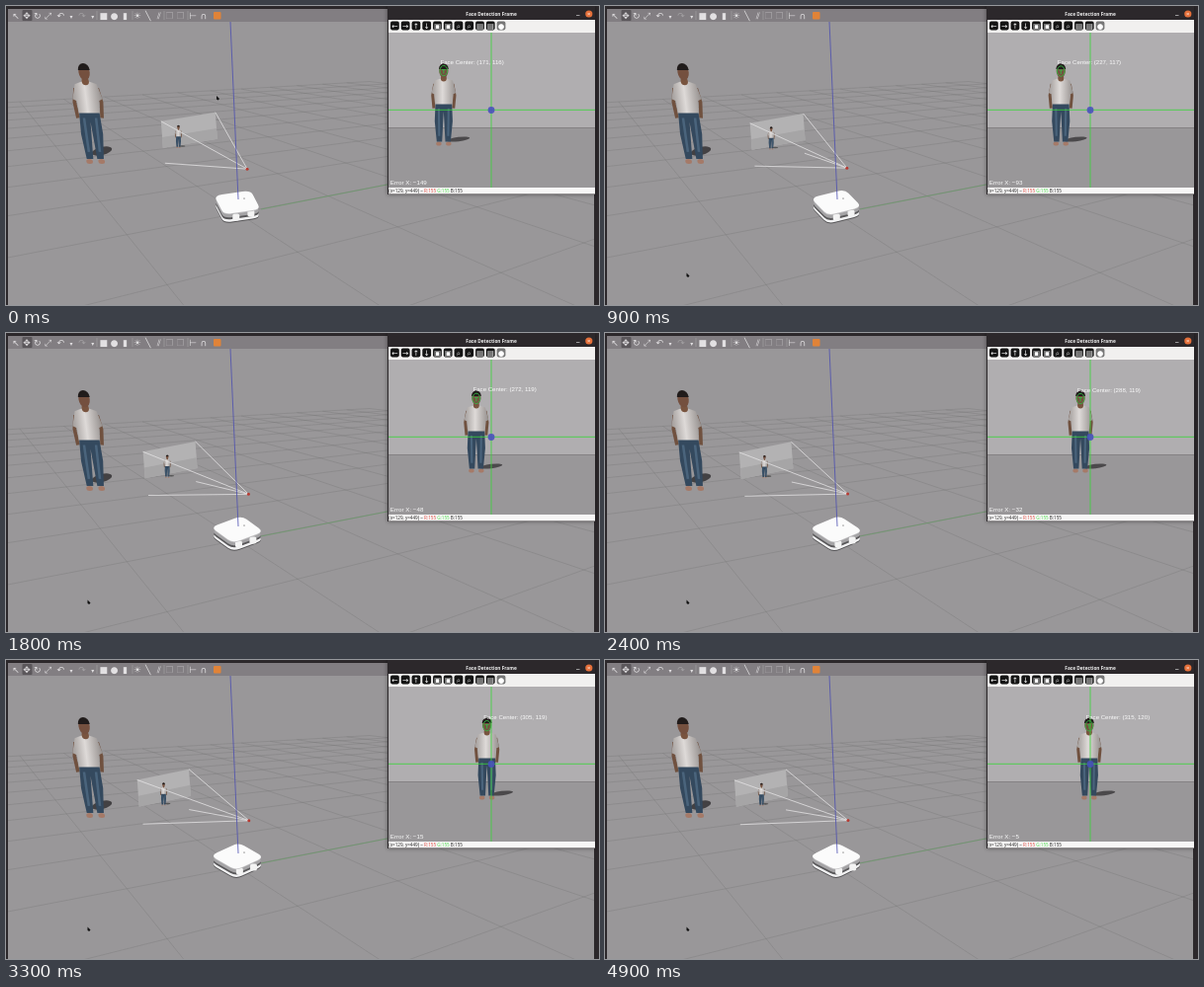
Recreate the animation shown at these times as an HTML page with a canvas. Size 600x303 px, loop 5 s.

```html
<!DOCTYPE html>
<html lang="en">
<head>
<meta charset="utf-8">
<title>Face tracking robot</title>
<style>
html, body { margin: 0; width: 100%; height: 100%; overflow: hidden; background: #999799; }
canvas { display: block; width: 600px; height: 303px; }
</style>
</head>
<body>
<canvas id="stage"></canvas>
<script>
const cv = document.getElementById('stage');
const c = cv.getContext('2d');
const dpr = window.devicePixelRatio || 1;
cv.width = 600 * dpr;
cv.height = 303 * dpr;

const LOOP = 5000, STEP = 100, FLOOR = '#999799', DARK = '#2c282b';
const UI = '"Open Sans", sans-serif', PLAIN = '"Liberation Sans", Arial, sans-serif';
const ICONS = '"DejaVu Sans", sans-serif';
// [time, horizontal error]; the error decays exponentially in between
const track = [[0, 149], [500, 128], [1300, 67], [2400, 32], [3300, 15], [4200, 8], [4900, 5]];

function errorAt(t) {
  const i = track.findIndex(([end]) => end >= t);
  if (i < 1) return track[0][1];
  const [t0, e0] = track[i - 1], [t1, e1] = track[i];
  return e0 * (e1 / e0) ** ((t - t0) / (t1 - t0));
}

function rect(x, y, w, h, color) {
  c.fillStyle = color;
  c.fillRect(x, y, w, h);
}

function trace(pts) {
  c.beginPath();
  pts.forEach(p => c.lineTo(...p));
}

function poly(pts, color) {
  trace(pts);
  c.fillStyle = color;
  c.fill();
}

function line(pts, color, width = 1) {
  trace(pts);
  c.strokeStyle = color;
  c.lineWidth = width;
  c.stroke();
}

function oval(x, y, rx, ry, color, tilt = 0) {
  c.beginPath();
  c.ellipse(x, y, rx, ry, tilt, 0, 7);
  c.fillStyle = color;
  c.fill();
}

function box(x, y, w, h, r, color) {
  c.beginPath();
  c.roundRect(x, y, w, h, r);
  c.fillStyle = color;
  c.fill();
}

function text(s, x, y, size, color, font = UI, weight = 400, align = 'left') {
  c.font = `${weight} ${size}px ${font}`;
  c.textAlign = align;
  c.fillStyle = color;
  c.fillText(s, x, y);
}

// ground point: u metres along the green axis, v metres away from the viewer
function ground(u, v) {
  const a = u * 0.077, b = v * 0.128, w = 1 + a + b;
  return [(235 + a * 1168 - b * 40) / w, (210 + (a + b) * 30) / w];
}

function grid() {
  const cell = 1.4, far = 10 * cell;
  for (let n = -10; n <= 10; n++) {
    const i = n * cell;
    const vNear = Math.max(-far, (-0.9 - i * 0.077) / 0.128);
    const uNear = Math.max(-far, (-0.9 - i * 0.128) / 0.077);
    line([ground(i, vNear), ground(i, far)], 'rgba(112,110,112,.5)', 0.6);
    line([ground(uNear, i), ground(far, i)], 'rgba(112,110,112,.5)', 0.6);
  }
}

// standing figure, 100 units tall, feet at the local origin
function person(x, y, s, lean = 0) {
  c.save();
  c.transform(s, 0, lean, s, x, y);
  const shirt = c.createLinearGradient(-14, 0, 14, 0);
  shirt.addColorStop(0, '#a5a09e');
  shirt.addColorStop(0.45, '#dedad8');
  shirt.addColorStop(1, '#989391');
  const mirror = half => [...half, ...half.map(([px, py]) => [-px, py]).reverse()];
  for (const side of [-1, 1]) {
    line([[side * 11, -76], [side * 13.5, -62], [side * 12, -46]], '#70513f', 3.6);
    oval(side * 6, -2.5, 3.3, 2.5, '#a57a68');
  }
  poly(mirror([[0, -42], [2, -5], [8.5, -5], [11, -30], [10, -54]]), '#34495e');
  for (const side of [-1, 1]) line([[side * 6, -46], [side * 5.5, -12]], '#4a647c', 2.5);
  poly(mirror([[3, -83], [11, -80], [15, -65], [11, -63], [10.5, -51]]), shirt);
  oval(0, -83, 3.6, 4, '#79543f');
  oval(0, -92, 5.6, 8.2, '#74503f');
  c.beginPath();
  c.ellipse(0, -94, 5.9, 7, 0, Math.PI, 0);
  c.fillStyle = '#211c1b';
  c.fill();
  c.restore();
}

// square plate with rounded corners, turned and seen from above at a slant
function plate(turn, dy, color) {
  const at = i => {
    const a = turn + Math.PI + i * Math.PI / 2;
    return [234 + 27 * Math.cos(a), 199 + dy + 14 * Math.sin(a)];
  };
  const toward = (p, q) => p.map((n, j) => n + (q[j] - n) * 0.22);
  c.beginPath();
  for (let i = 0; i < 4; i++) {
    const p = at(i);
    c.lineTo(...toward(p, at(i - 1)));
    c.quadraticCurveTo(...p, ...toward(p, at(i + 1)));
  }
  c.closePath();
  c.fillStyle = color;
  c.fill();
}

function robot(e) {
  const turn = e * 0.0035;
  plate(turn, 9.5, '#555456');
  plate(turn, 8.5, '#f2f2f3');
  plate(turn, 6, '#59585a');
  plate(turn, 4, '#a5a4a6');
  for (const a of [1.45, 0.75]) {
    const x = 234 + 23 * Math.cos(a + turn / 3), y = 199 + 12.5 * Math.sin(a);
    box(x - 3.5, y - 1, 7, 7, 2, '#f3f3f3');
  }
  plate(turn, 0.8, '#c4c3c5');
  plate(turn, 0, '#fbfbfb');
  oval(241, 195, 0.9, 0.6, '#777');
}

function frustum(e) {
  const apex = [246 - e * 0.013, 162.5 + e * 0.018];
  const corner = (right, down) => [
    130 + e * 0.18 + right * (52 + e * 0.02) + down * 2,
    122 - e * 0.035 - right * (11 - e * 0.013) + down * 27
  ];
  const low = right => [136 + e * 0.167 + right * (46 + e * 0.048), 167 - e * 0.052 - right * (15 - e * 0.022)];
  poly([corner(0, 0), corner(1, 0), corner(1, 1), corner(0, 1)], '#b3b2b3');
  poly([corner(0, 0.6), corner(1, 0.6), corner(1, 1), corner(0, 1)], '#a6a5a6');
  const x = 157.8 + e * 0.112, y = 148 - e * 0.027;
  oval(x + 4, y - 2, 3, 0.8, '#555');
  person(x, y, 0.23);
  const rays = [corner(0, 0), corner(1, 0), low(0)];
  if (e < 100) rays.push(low(1));
  for (const p of rays) line([apex, p], '#e4e3e4', 0.8);
  oval(...apex, 1.5, 1.5, '#b83a32');
}

function toolbar() {
  rect(0, 0, 600, 3, DARK);
  rect(2, 3, 593, 13, '#827e82');
  rect(0, 0, 2, 303, DARK);
  rect(595, 0, 5, 303, DARK);
  box(16.5, 4, 10, 11, 1, '#5b575b');
  let x = 10;
  for (const ch of '↖✥↻⤢ ↶▾↷▾■●▮ ☀╲⫽❐❐ ⊢∩') {
    const dim = '↷❐'.includes(ch);
    if (ch == ' ') x += 1.5;
    else {
      text(ch, x, 12.8, ch == '▾' ? 6 : 9, dim ? '#a3a0a3' : '#e2e0e2', ICONS, 400, 'center');
      x += 10.9;
    }
  }
  for (const bar of [92, 128, 160, 184]) line([[bar, 5], [bar, 14]], '#a19ea1', 0.7);
  box(210, 6, 7.5, 7.5, 1, '#e08338');
}

function buttons() {
  [...'←→↑↓▣▣⌕⌕▤▤●'].forEach((ch, i, all) => {
    const x = 393.4 + i * 10.76;
    box(x - 4.4, 15.6, 8.8, 8.8, 1.8, i == all.length - 1 ? '#777' : '#141414');
    text(ch, x, 22.7, 7.5, '#fff', ICONS, 400, 'center');
  });
}

function cameraWindow(e) {
  const err = Math.round(e), fy = 119.8 - e * 0.025;
  const fx = 387 + (320 - e) * 0.3266, top = 27.6 + fy * 0.327;
  c.save();
  c.shadowColor = 'rgba(0,0,0,.45)';
  c.shadowBlur = 4 * dpr;
  rect(386, 0, 210, 191, DARK);
  c.restore();
  text('Face Detection Frame', 491, 10, 4.75, '#f2f2f2', UI, 700, 'center');
  line([[577, 9.5], [580.5, 9.5]], '#ccc', 0.7);
  oval(589.8, 8, 3.6, 3.6, '#e5703a');
  text('×', 589.8, 10, 6, '#fff', UI, 400, 'center');
  rect(387, 14, 209, 13, '#f1f0ef');
  buttons();

  rect(387, 27, 209, 96.5, '#b0aeb0');
  rect(387, 123.5, 209, 60.5, FLOOR);
  oval(fx + 15, 135, 11.5, 2.2, '#4b494b', -0.12);
  person(fx, 141.6, 0.825);
  const cross = 'rgba(55,215,55,.8)';
  line([[491, 27], [491, 184]], cross);
  line([[387, 105.3], [596, 105.3]], cross);
  c.beginPath();
  c.ellipse(fx, top, 3.8, 5.2, 0, 0, 7);
  c.moveTo(fx - 2, top - 1);
  c.lineTo(fx + 2, top - 1);
  c.moveTo(fx, top - 1);
  c.lineTo(fx, top + 3);
  c.strokeStyle = '#35b845';
  c.lineWidth = 0.9;
  c.stroke();
  oval(491, 105.5, 3.4, 3.4, 'rgba(72,78,190,.88)');
  text(`Face Center: (${320 - err}, ${Math.round(fy)})`, fx - 3.4, top - 7, 6.1, '#fafafa', PLAIN);
  text(`Error X: −${err}`, 388.8, 181.2, 6.2, '#fafafa', PLAIN);

  rect(387, 184, 209, 6.5, '#f7f6f6');
  let x = 387.3;
  for (const [s, color] of [['(x=129, y=449) ~ ', '#222'], ['R:155 ', '#e2493f'], ['G:155 ', '#4be04b'], ['B:155', '#222']]) {
    text(s, x, 189.1, 4.6, color);
    x += c.measureText(s).width;
  }
}

// leaves to the lower left, then comes back to rest
function pointer(t) {
  if (t >= 400 && t < 800) return;
  const k = t / 400;
  const [x, y] = t < 400 ? [214 - 200 * k, 93 + 179 * k] : [83.5, 272.5];
  poly([[x - 1, y - 2], [x + 2, y + 1], [x + 0.6, y + 2.5], [x - 1, y + 1.5]], '#111');
}

function draw(now) {
  const t = Math.floor(now % LOOP / STEP) * STEP;
  const e = errorAt(t);
  c.setTransform(dpr, 0, 0, dpr, 0, 0);
  rect(0, 0, 600, 303, FLOOR);
  grid();
  line([[258, 206], [388, 180.5]], '#689a66', 0.7);
  oval(97, 147, 10.5, 4, '#434143', -0.25);
  person(91, 160, 1.01, 0.13);
  frustum(e);
  robot(e);
  line([[227, 16], [235, 196]], '#4c4fb0', 0.8);
  toolbar();
  cameraWindow(e);
  pointer(t);
}

const begin = performance.now();
function tick() {
  draw(performance.now() - begin);
  requestAnimationFrame(tick);
}
tick();
</script>
</body>
</html>
```
